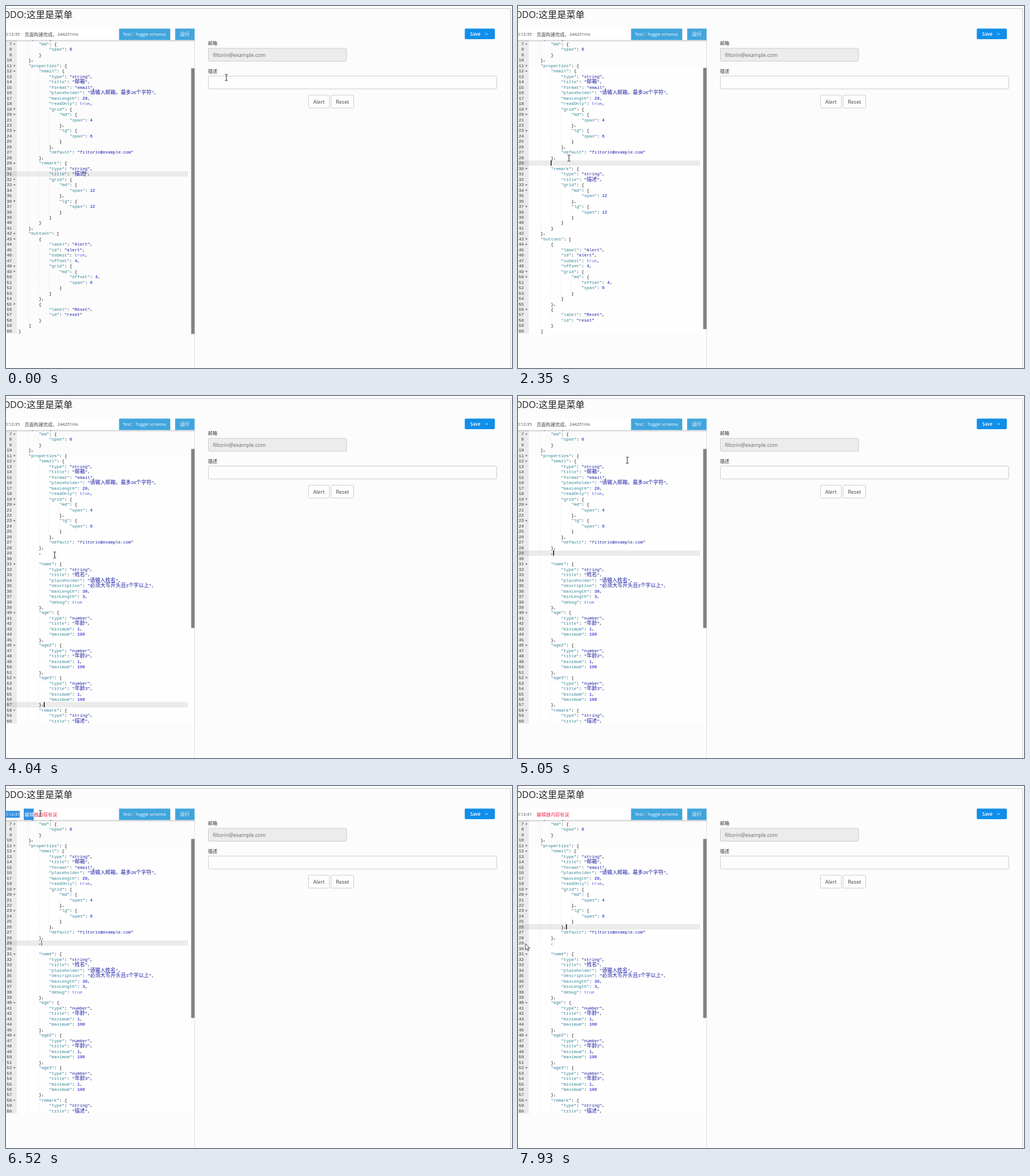
An HTML page that plays this animation: 884 px wide and 633 px high, repeating every 8 s.

```html
<!DOCTYPE html>
<html lang="zh-CN">
<head>
<meta charset="utf-8">
<title>Schema form editor</title>
<style>
  html, body { margin: 0; width: 100%; height: 100%; overflow: hidden; background: #fcfcfc; }
  svg { display: block; width: 884px; height: 633px; font-family: "Open Sans", "Noto Sans CJK SC", "Noto Sans CJK", sans-serif; }
  .code { font: 7.45px "Liberation Mono", "DejaVu Sans Mono", monospace; fill: #111; }
  .cjk { font-family: "Noto Sans CJK SC", "Noto Sans CJK", sans-serif; }
  .code .cjk { font-size: 8.94px; }
  .key { fill: #318495; }
  .str { fill: #1a1aa6; }
  .num { fill: #0000cd; }
  .bool { fill: #585cf6; }
  .gut { fill: #333; }
  .label { font-size: 8.2px; fill: #333; }
  .btn { font-size: 9px; fill: #444; text-anchor: middle; }
  .status { font-size: 7.45px; fill: #444; }
  .status .cjk { font-size: 8.14px; }
  .box { stroke: #ccc; }
</style>
</head>
<body>
<svg viewBox="0 0 884 633" xmlns="http://www.w3.org/2000/svg">
  <defs>
    <clipPath id="pane"><rect x="0" y="57" width="330" height="516"/></clipPath>
    <linearGradient id="shade" x2="0" y2="1">
      <stop offset="0" stop-opacity=".2"/><stop offset="1" stop-opacity="0"/>
    </linearGradient>
  </defs>
  <rect width="884" height="633" fill="#fcfcfc"/>
  <path d="M0 4.5H881.5V633" fill="none" stroke="#ccc"/>
  <text x="35.5" y="20.5" font-size="16" fill="#222" text-anchor="end">TODO:</text>
  <text x="36" y="20.5" font-size="16.1" fill="#222" class="cjk">这里是菜单</text>

  <rect id="fresh" y="107" x="19" width="311" height="466" fill="#fefefe"/>
  <rect y="60" width="19" height="513" fill="#ebebeb"/>
  <rect id="gutLine" width="19" height="9.47" fill="#dadada"/>
  <rect id="line" x="19" width="299" height="9.47" fill="#ebebeb"/>
  <g id="docs" clip-path="url(#pane)"></g>
  <rect id="caret" height="9.2" fill="#000"/>
  <path d="M329.5 60V633" stroke="#ddd"/>
  <rect id="thumb" x="323.5" width="6" fill="#828282"/>

  <rect y="39" width="330" height="20.6" fill="#fff"/>
  <rect y="59.6" width="330" height="3.4" fill="url(#shade)"/>
  <rect id="selTime" y="43.5" width="24" height="12" fill="#338fe3"/>
  <rect id="selWord" x="31" y="39.5" width="17.5" height="20" fill="#338fe3"/>
  <g class="status">
    <text id="clock" x="24" y="52.3" text-anchor="end"></text>
    <g id="ok"><text x="32.5" y="52.5" class="cjk">页面构建完成，</text><text x="90" y="52.3">244251ms</text></g>
    <text id="bad" x="32.5" y="52.5" class="cjk" fill="#ee2f50"><tspan id="word">编辑</tspan>器内容有误</text>
  </g>
  <rect x="197.5" y="39.5" width="89.5" height="20" fill="#41a5dd"/>
  <text x="204" y="52.3" font-size="7.7" fill="#fff">Test：Toggle schema</text>
  <rect id="run" x="295.5" y="39.5" width="34" height="20"/>
  <text x="312.3" y="52.4" font-size="8.3" fill="#fff" text-anchor="middle" class="cjk">运行</text>

  <rect x="801.5" y="39.5" width="52.5" height="18.5" rx="2" fill="#108ee9"/>
  <text x="811" y="52" font-size="8" font-weight="600" fill="#fff">Save</text>
  <path d="M837.2 47.8l2.4 2.4 2.4-2.4" fill="none" stroke="#fff"/>
  <text x="352.8" y="67.8" class="label cjk">邮箱</text>
  <rect x="353.5" y="74" width="241.5" height="22.5" rx="2" fill="#ececec" class="box"/>
  <text x="361.5" y="89.2" font-size="9" fill="#666">filtorin@example.com</text>
  <text x="352.8" y="116.6" class="label cjk">描述</text>
  <rect x="353.5" y="122.5" width="504" height="22.5" rx="2" fill="#fdfdfd" class="box"/>
  <rect x="528.5" y="156" width="36.5" height="22.5" rx="2" fill="#fefefe" class="box"/>
  <text x="546.8" y="170.5" class="btn">Alert</text>
  <rect x="568" y="156" width="39.5" height="22.5" rx="2" fill="#fefefe" class="box"/>
  <text x="587.8" y="170.5" class="btn">Reset</text>

  <g id="mouse">
    <path id="beam" d="M-2.5-5.2H-.6L0-4.7.6-5.2H2.5M0-4.7V4.7M-2.5 5.2H-.6L0 4.7.6 5.2H2.5" fill="none" stroke="#222"/>
    <path id="hand" d="M-3.2-6.5c0-1.6 2.2-1.6 2.2 0V-1.7l4.2.8c1.6.3 2.1 1 2.1 2.3L4.7 5 3.7 8.3H-2.3L-5.3 3.3c-.9-1.4.6-2.2 1.4-1.3l.7.8z" fill="#fff" stroke="#111" stroke-width=".9"/>
    <path id="arrow" d="M0 0V11L2.5 8.7 4.3 12.6 6 11.9 4.2 8.1H7.6Z" fill="#fff" stroke="#111" stroke-width=".8"/>
  </g>
</svg>
<script>
const $ = id => document.getElementById(id);
const LOOP = 8000, CELL = 4.47, ROW = 9.47, LEFT = 21.7;
const rowY = n => 270 + (n - 29) * ROW;
const colX = c => LEFT + c * CELL;

const grid = (md, lg) => ({ md: { span: md }, lg: { span: lg } });
const age = title => ({ type: "number", title, minimum: 1, maximum: 100 });
const schema = {
  grid: { md: { span: 6 } },
  properties: {
    email: {
      type: "string", title: "邮箱", format: "email",
      placeholder: "请输入邮箱，最多20个字符",
      maxLength: 20, readOnly: true, grid: grid(4, 6),
      default: "filtorin@example.com"
    },
    remark: { type: "string", title: "描述", grid: grid(12, 12) }
  },
  buttons: [
    { label: "Alert", id: "alert", submit: true, offset: 4, grid: { md: { offset: 4, span: 6 } } },
    { label: "Reset", id: "reset" }
  ]
};
const extra = {
  name: {
    type: "string", title: "姓名", placeholder: "请输入姓名",
    description: "必须大写开头且3个字以上",
    maxLength: 30, minLength: 3, debug: true
  },
  age: age("年龄"), age2: age("年龄2"), age3: age("年龄3")
};

// The pane is scrolled: the first row drawn is number 6, new rows go in after 28.
const FIRST = 6, LAST = 60, SPLIT = 23;
const rows = o => JSON.stringify(o, null, 4).split("\n").slice(1);
const base = rows(schema);
const insert = list => [...base.slice(0, SPLIT), ...list, ...base.slice(SPLIT)];
const pasted = rows(extra).slice(0, -1).map(s => "    " + s);
pasted[pasted.length - 1] += ",";
const docs = [base, insert([""]), insert(["        ,", "", ...pasted])];

function kind(tok, rest) {
  if (tok[0] === '"') return rest[0] === ":" ? "key" : "str";
  if (/^\d/.test(tok)) return "num";
  return tok === "true" ? "bool" : "";
}

function drawRow(s, n) {
  const y = rowY(n), base = y + 7.3;
  const put = (x, cls, txt) => `<text x="${x}" y="${base}" class="${cls}">${txt}</text>`;
  let out = put(10.3 - String(n).length * CELL, "gut", n);
  if (/[{[]$/.test(s)) out += `<path d="M12.7 ${y + 4}h3.8l-1.9 2.2z" fill="#555"/>`;
  for (let c = 4; c < s.search(/\S/); c += 4)
    out += `<path d="M${colX(c) - .5} ${y}v${ROW}" stroke="#000" stroke-opacity=".05"/>`;
  let col = 0;
  for (const m of s.matchAll(/\s+|"[^"]*"|\w+|[^\s\w"]+/g)) {
    const cls = kind(m[0], s.slice(m.index + m[0].length));
    for (const part of m[0].match(/[\u3000-\uffef]+|[^\u3000-\uffef]+/g)) {
      const wide = part >= "\u3000";
      if (part.trim()) out += put(colX(col), cls + (wide ? " cjk" : ""), part);
      col += part.length * (wide ? 2 : 1);
    }
  }
  return out;
}

$("docs").innerHTML = docs.map(d =>
  `<g class="code">${d.slice(0, LAST - FIRST + 1).map((s, i) => drawRow(s, FIRST + i)).join("")}</g>`).join("");
const views = [...$("docs").children];

// Each move: start time, number of steps, where it ends.
const STEP = 125;
const moves = [
  [150, 3, 248, 187], [700, 7, 89, 266], [3340, 6, 85, 278], [4440, 1, 76, 278],
  [4750, 6, 306, 57], [5740, 1, 168, 53], [5860, 4, 8, 49], [6520, 1, 60, 48],
  [6650, 5, 122, 243], [7630, 3, 13, 275.5]
];

function pointer(t) {
  let x = 385, y = 125;
  for (const [start, n, toX, toY] of moves) {
    if (t < start) break;
    const p = Math.min(1, (Math.floor((t - start) / STEP) + 1) / n);
    x += (toX - x) * p;
    y += (toY - y) * (1 - (1 - p) ** 2);
  }
  return [x, y];
}

// What each click or key press changes.
const events = [
  { t: 0, doc: 0, row: 31, col: 26, caret: .7, pick: 0, failed: false },
  { t: 1610, row: 28, col: 10, caret: 1.4 },
  { t: 2230, doc: 1, row: 29, col: 8 },
  { t: 2750, doc: 2, row: 57, col: 10 },
  { t: 4290, row: 29, col: 9 },
  { t: 5500, caret: .7, failed: true },
  { t: 6110, pick: 1 },
  { t: 6235, pick: 2 },
  { t: 7340, row: 26, col: 14, caret: 1.4, pick: 0 }
];

const show = (el, on) => el.setAttribute("visibility", on ? "visible" : "hidden");
const set = (id, attrs) => { for (const k in attrs) $(id).setAttribute(k, attrs[k]); };

function draw(t) {
  const s = Object.assign({}, ...events.filter(e => e.t <= t));
  const [x, y] = pointer(t);
  const over = x > 295 && x < 330 && y < 60;
  const gutter = x < 19 && y > 60;
  const total = docs[s.doc].length + FIRST - 1;

  views.forEach((v, i) => show(v, i === s.doc));
  show($("fresh"), s.doc > 0);
  set("thumb", { y: 58.4 + 3038 / total, height: 27860 / total });
  set("line", { y: rowY(s.row) });
  set("gutLine", { y: rowY(s.row) });
  set("caret", { x: colX(s.col) - s.caret / 2 + .3, y: rowY(s.row), width: s.caret });

  show($("ok"), !s.failed);
  show($("bad"), s.failed);
  $("clock").textContent = s.failed ? "0:12:41" : "0:12:35";
  show($("selWord"), s.pick > 0);
  show($("selTime"), s.pick > 1);
  set("word", { fill: s.pick > 0 ? "#fff" : "#ee2f50" });
  set("clock", { fill: s.pick > 1 ? "#fff" : "#444" });
  set("run", { fill: over ? "#2a7cab" : "#41a5dd" });

  set("mouse", { transform: `translate(${x} ${y})` });
  show($("hand"), over);
  show($("arrow"), gutter);
  show($("beam"), !over && !gutter);
}

function tick() {
  draw(performance.now() % LOOP);
  requestAnimationFrame(tick);
}
tick();
</script>
</body>
</html>
```
